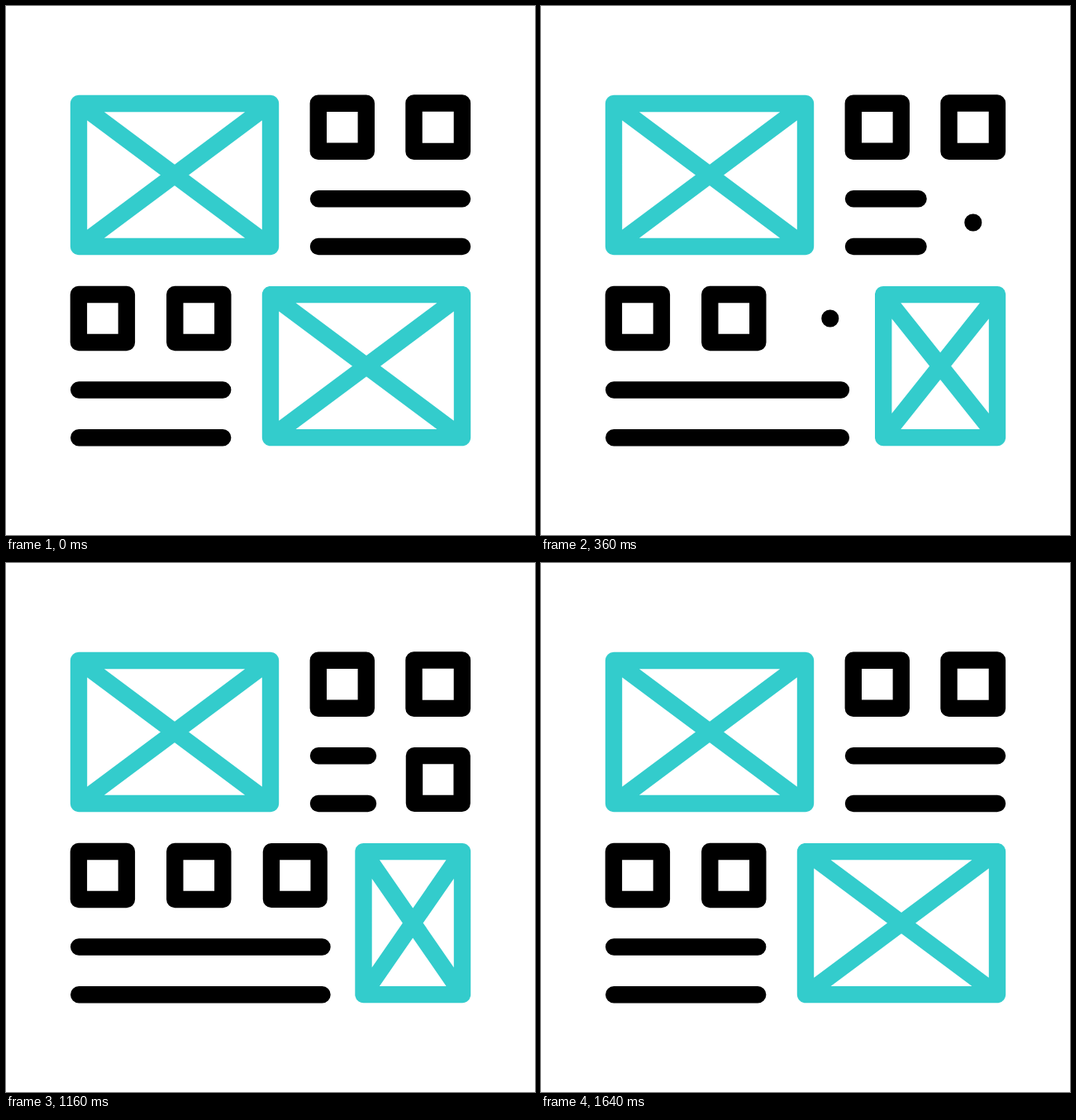
Animation, 640 px wide and 640 px high, one loop 2.12 s. Source, as an HTML page:

```html
<!DOCTYPE html>
<html lang="en">
<head>
<meta charset="utf-8">
<title>Layout wireframe</title>
<style>
  html, body { margin: 0; height: 100%; overflow: hidden; background: #fff; }
  svg { display: block; width: 100%; height: 100%; }
  path { fill: none; stroke-width: 20.4; stroke-linecap: round; stroke-linejoin: round; }
  .image { stroke: #33cccc; }
  .text { stroke: #000; }
</style>
</head>
<body>
<svg viewBox="0 0 640 640">
  <path class="image" id="images"/>
  <path class="text" id="texts"/>
</svg>
<script>
const LOOP = 2120, STEP = 40;
const images = document.getElementById('images');
const texts = document.getElementById('texts');

const mix = (a, b, k) => a + (b - a) * k;

// Easing curve with control points (x1, 0) and (x2, 1).
function ease(x, x1, x2) {
  if (x <= 0) return 0;
  if (x >= 1) return 1;
  let low = 0, high = 1, s;
  for (let i = 0; i < 30; i++) {
    s = (low + high) / 2;
    const at = 3 * s * (1 - s) ** 2 * x1 + 3 * s * s * (1 - s) * x2 + s ** 3;
    if (at < x) low = s; else high = s;
  }
  return s * s * (3 - 2 * s);
}

const opening = (t, start, end) => ease((t - start) / (end - start), 0.6, 0);
const closing = (t, start, end) => ease((t - start) / (end - start), 1, 0.236);

const line = (x1, x2, y) => `M${x1} ${y}H${x2}`;
const rect = (x1, y1, x2, y2) => `M${x1} ${y1}H${x2}V${y2}H${x1}Z`;
const square = (cx, cy, size) =>
  rect(cx - size / 2, cy - size / 2, cx + size / 2, cy + size / 2);
const picture = (x1, y1, x2, y2) =>
  rect(x1, y1, x2, y2) + `M${x1} ${y1}L${x2} ${y2}M${x2} ${y1}L${x1} ${y2}`;

function draw(t) {
  const shift = opening(t, 80, 640) - closing(t, 1200, 1640);
  const grow = opening(t, 320, 720) - closing(t, 1120, 1450);

  images.setAttribute('d',
    picture(88, 118, 320, 291) +
    picture(mix(320, 432.5, shift), 349.1, 552, 522.1));

  const upperEnd = mix(552, 438, shift);
  const lowerEnd = mix(262.2, 382.5, shift);
  let d = square(406.8, 146.7, 58) + square(522.7, 146.7, 58.4) +
    square(116.9, 378, 58) + square(233.3, 378, 58) +
    line(378, upperEnd, 233.3) + line(378, upperEnd, 291) +
    line(88.2, lowerEnd, 464.5) + line(88.2, lowerEnd, 522.2);
  if (grow > 0) {
    d += square(522.8, 262, 58 * grow) + square(349.8, 378, 58 * grow);
  }
  texts.setAttribute('d', d);
}

const begin = performance.now();
function tick() {
  const t = (performance.now() - begin) % LOOP;
  draw(Math.floor(t / STEP) * STEP);
  requestAnimationFrame(tick);
}
tick();
</script>
</body>
</html>
```
